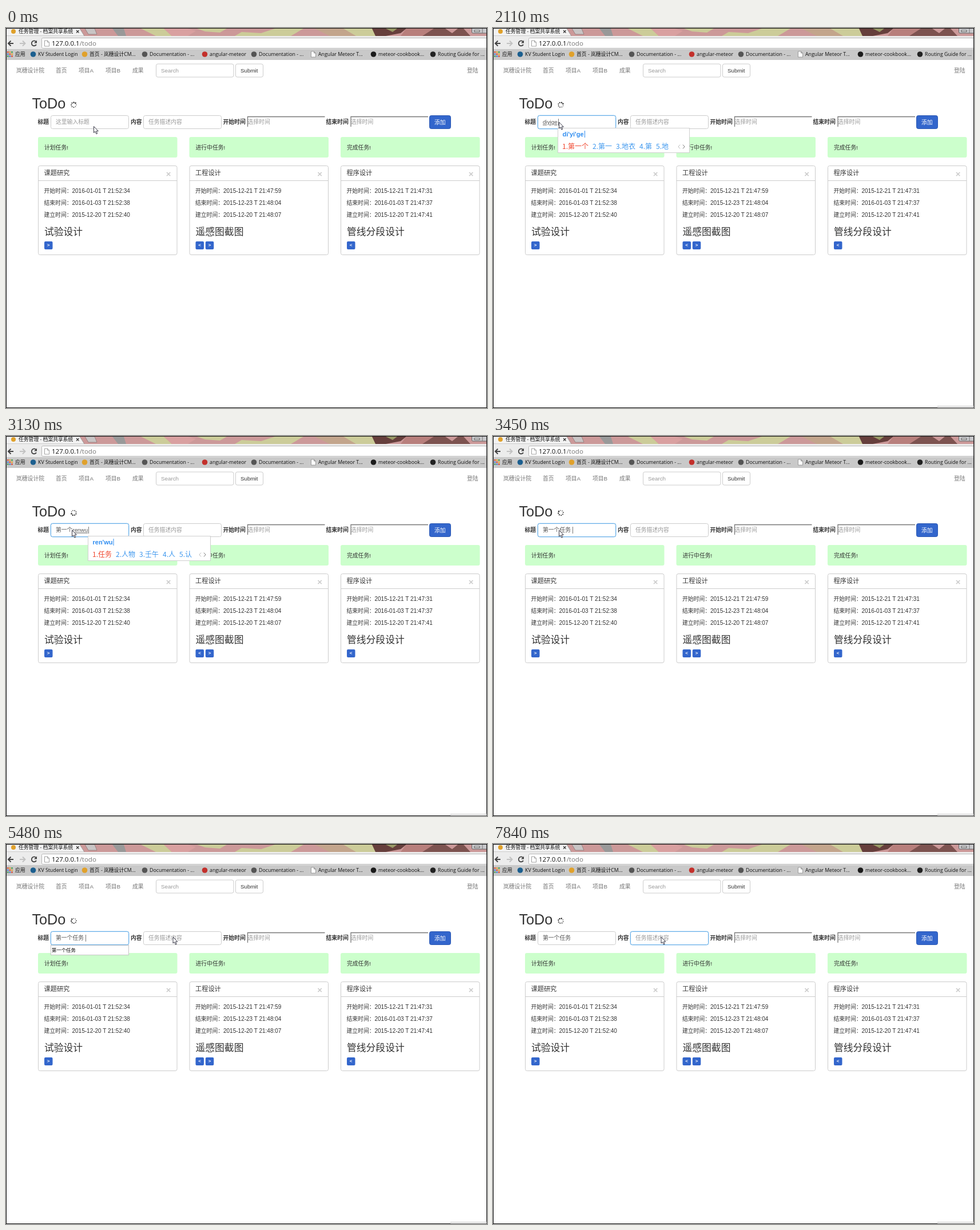
Write an HTML page that moves like this. It is 841 px wide and 666 px high and loops after 8000 ms.

```html
<!DOCTYPE html>
<html>
<head>
<meta charset="utf-8">
<style>
  html, body { margin: 0; width: 100%; height: 100%; overflow: hidden; background: #fff; }
  svg { display: block; width: 841px; height: 666px; }
  text { font-family: "Liberation Sans", "Noto Sans CJK SC", "Noto Sans CJK", sans-serif; font-size: 9.8px; fill: #333; white-space: pre; }
  .chrome { font-family: "Open Sans", "Noto Sans CJK SC", "Noto Sans CJK", sans-serif; font-size: 8.8px; fill: #111; }
  .url { font-family: "Open Sans", sans-serif; font-size: 11.5px; fill: #111; }
  .nav { fill: #777; }
  .hint { fill: #999; }
  .typed { fill: #555; }
  .label { font-weight: bold; }
  .alert { font-weight: 500; }
  .h1 { font-size: 25.2px; }
  .cardTitle { font-size: 11.2px; }
  .body { font-size: 16.8px; font-weight: 300; }
  .date { font-size: 10px; }
  .close { font-size: 15px; font-weight: bold; fill: #ccc; }
  .white { fill: #fff; }
  .arrow { font-size: 8px; font-weight: bold; fill: #fff; text-anchor: middle; }
  .suggestion { font-size: 8.4px; fill: #000; }
  .pinyin { font-size: 11px; font-weight: bold; fill: #2d8cf0; }
  .candidate { font-family: "Noto Sans CJK SC", "Noto Sans CJK", sans-serif; font-size: 12px; fill: #3d97ee; }
  .first { fill: #f0452c; }
  .composing { text-decoration: underline; }
</style>
</head>
<body>
<svg viewBox="0 0 841 666"><g id="page"></g><g id="live"></g></svg>
<script>
const LOOP = 8000;
const BLUE = '#3366cc';

const text = (x, y, str, cls = '') => `<text x="${x}" y="${y}" class="${cls}">${str}</text>`;
const rect = (x, y, w, h, fill, stroke = 'none', r = 0) =>
  `<rect x="${x}" y="${y}" width="${w}" height="${h}" rx="${r}" fill="${fill}" stroke="${stroke}"/>`;
const dot = (x, y, r, fill) => `<circle cx="${x}" cy="${y}" r="${r}" fill="${fill}"/>`;
const path = (d, fill, stroke = 'none', w = 1) =>
  `<path d="${d}" fill="${fill}" stroke="${stroke}" stroke-width="${w}"/>`;
const field = (x, y, w) => rect(x, y, w, 23, '#fff', '#ccc', 3);
const pageIcon = (x, y) => path(`M${x} ${y}h5l3 3v7h-8zM${x + 5} ${y}v3h3`, '#fff', '#888', .8);

function tabStrip() {
  const patches = [
    ['M186 1H206L210 14H196Z', '#999999'],
    ['M236 1H276L290 14H262Z', '#cccc99'],
    ['M276 1H318L332 5L318 14H290Z', '#d9a0a0'],
    ['M334 1H386L374 8L348 6Z', '#cccc99'],
    ['M400 14L412 7L446 9L470 1H520L498 14Z', '#cccc99'],
    ['M540 1H590L612 14H566Z', '#c3a58c'],
    ['M590 1H642L650 14H612Z', '#cccc99'],
    ['M640 1H700L690 9L664 14H646Z', '#663f3c'],
    ['M664 1H684L676 7Z', '#999966'],
    ['M700 1H756L734 14H690Z', '#b87f7c'],
    ['M748 1H800L812 14H728Z', '#7d5350'],
    ['M768 1H790L780 9Z', '#cc9999']
  ];
  return rect(0, 0, 841, 14, '#cc9999')
    + patches.map(p => path(...p)).join('')
    + path('M0 14V1H129L137 14Z', '#f2f2f2', '#888', .7)
    + path('M138 1H155L159 11H144Z', '#c9c5c5', '#8d7777', .8)
    + dot(13, 6, 4, '#e0a12b')
    + text(22, 9.3, '任务管理 - 档案共享系统', 'chrome')
    + path('M123 4l4.5 4.5m0-4.5l-4.5 4.5', 'none', '#333', 1.2)
    + rect(814.5, -2, 27, 11, '#c9c9cc', '#666', 2)
    + rect(819, 4, 9, 2.5, '#fff', '#555') + path('M833 0V9', 'none', '#777');
}

function toolbar() {
  return rect(0, 14, 841, 23, '#ececec')
    + path('M13 27H4.5M8.5 22.5L4 27L8.5 31.5', 'none', '#444', 2)
    + path('M24 27H33M29 22.5L33.5 27L29 31.5', 'none', '#c2c2c2', 2)
    + path('M52.5 24A4.4 4.4 0 1 0 53 29', 'none', '#444', 1.8)
    + path('M54 21.5V26.5H49Z', '#444')
    + rect(62.5, 17.5, 790, 18, '#fff', '#b5b5b5', 2)
    + pageIcon(67.5, 22)
    + text(80, 31, '127.0.0.1<tspan fill="#777">/todo</tspan>', 'url');
}

function bookmarks() {
  const hues = ['#d9442f', '#e8a020', '#3c9a4c', '#3f78d0'];
  let out = rect(0, 37, 841, 19, '#c9c9c9');
  for (let i = 0; i < 9; i++) out += rect(2 + i % 3 * 3.6, 41 + (i / 3 | 0) * 3.6, 2.5, 2.5, hues[i % 4]);
  const items = [
    [16, '应用'], [56, 'KV Student Login', '#1c5f8f'], [146, '首页 - 岚穗设计CM...', '#e0a12b'],
    [251, 'Documentation - ...', '#555'], [356, 'angular-meteor', '#c3302b'],
    [442, 'Documentation - ...', '#555'], [546, 'Angular Meteor T...', 'page'],
    [651, 'meteor-cookbook...', '#1b1b1b'], [755, 'Routing Guide for ...', '#222']
  ];
  for (const [x, label, icon] of items) {
    out += text(x, 49.3, label, 'chrome');
    if (icon === 'page') out += pageIcon(x - 12.5, 41);
    else if (icon) out += dot(x - 8.5, 46, 4.8, icon);
  }
  return out;
}

function navbar() {
  const links = [[18, '岚穗设计院'], [87, '首页'], [127, '项目A'], [174, '项目B'], [221, '成果'], [806, '登陆']];
  return links.map(([x, s]) => text(x, 78.3, s, 'nav')).join('')
    + field(262.5, 63, 135.5) + text(271, 78, 'Search', 'hint')
    + field(401.5, 63, 48) + text(410, 78, 'Submit');
}

function form() {
  const dateField = x => path(`M${x} 173V155.5H${x + 135}`, 'none', '#777', 1.3)
    + text(x, 168, '选择时间', 'hint');
  return text(45.5, 141.3, 'ToDo', 'h1')
    + text(55.5, 168, '标题', 'label') + field(78.5, 153.5, 136)
    + text(218, 168, '内容', 'label') + field(240.5, 153.5, 136)
    + text(379.5, 168, '开始时间', 'label') + dateField(422.5)
    + text(559.5, 168, '结束时间', 'label') + dateField(603)
    + rect(740.5, 153.5, 37, 23, BLUE, '#2d59b3', 3) + text(749, 168.6, '添加', 'white');
}

function column(x, heading, title, times, body, arrows) {
  const rows = ['开始时间：', '结束时间：', '建立时间：'];
  return rect(x, 191, 243.5, 36, '#ccffcc', 'none', 3)
    + text(x + 11, 212.5, heading, 'alert')
    + rect(x + .5, 241.5, 242.5, 156, '#fff', '#ccc', 3)
    + path(`M${x} 267.5h243`, 'none', '#ccc')
    + text(x + 10.5, 258.3, title, 'cardTitle')
    + text(x + 223.7, 260.8, '×', 'close')
    + rows.map((s, i) => text(x + 10.5, 289 + 21 * i, s) + text(x + 59.5, 289 + 21 * i, times[i], 'date')).join('')
    + text(x + 11, 363, body, 'body')
    + arrows.map((s, i) => rect(x + 11 + 17.3 * i, 374, 14.5, 14, BLUE, 'none', 2)
      + text(x + 18.2 + 17.3 * i, 383.4, s, 'arrow')).join('');
}

document.getElementById('page').innerHTML = rect(0, 0, 841, 666, '#fff')
  + tabStrip() + toolbar() + bookmarks() + navbar() + form()
  + column(56, '计划任务!', '课题研究',
    ['2016-01-01 T 21:52:34', '2016-01-03 T 21:52:38', '2015-12-20 T 21:52:40'], '试验设计', ['&gt;'])
  + column(320.5, '进行中任务!', '工程设计',
    ['2015-12-21 T 21:47:59', '2015-12-23 T 21:48:04', '2015-12-20 T 21:48:07'], '遥感图截图', ['&lt;', '&gt;'])
  + column(585, '完成任务!', '程序设计',
    ['2015-12-21 T 21:47:31', '2016-01-03 T 21:47:37', '2015-12-20 T 21:47:41'], '管线分段设计', ['&lt;'])
  + rect(.5, .5, 840, 665, 'none', '#111');

// Each step changes only the listed properties; the rest carry over.
const steps = [
  { at: 0, mouse: [153.5, 172.5], title: '', keys: '', focus: null, glow: false, caret: 0, ime: null, suggest: false },
  { at: 100, mouse: [115.5, 172] },
  { at: 420, mouse: [115.5, 165] },
  { at: 770, focus: 78.5, caret: 88 },
  { at: 1110, glow: true },
  { at: 1450, caret: 0 },
  { at: 1770, keys: 'd', caret: 94, ime: [94, 182, 'd', '的 地 到 对 都'] },
  { at: 2110, keys: 'diyige', caret: 114, ime: [113, 231, "di'yi'ge", '第一个 第一 地衣 第 地'] },
  { at: 2460, title: '第一个', keys: '', caret: 117, ime: null, suggest: true },
  { at: 2780, keys: 're', caret: 126, ime: [124, 206, 're', '热 惹 热情 热爱 喏'], suggest: false },
  { at: 3130, keys: 'renwu', caret: 144, ime: [143, 215, "ren'wu", '任务 人物 壬午 人 认'] },
  { at: 3450, title: '第一个任务', keys: '', caret: 139, ime: null },
  { at: 3800, caret: 0 },
  { at: 4110, mouse: [228.5, 161] },
  { at: 4460, mouse: [282.5, 161.5], caret: 139 },
  { at: 4800, mouse: [281.5, 160.5], caret: 0 },
  { at: 5140, mouse: [282, 164] },
  { at: 5480, mouse: [292, 163], caret: 139, suggest: true },
  { at: 5830, mouse: [294, 163], focus: 240.5, glow: false, caret: 249, suggest: false },
  { at: 6170, glow: true },
  { at: 6490, caret: 0 },
  { at: 6830 },
  { at: 7170, caret: 249 },
  { at: 7520, caret: 0 },
  { at: 7840 }
];
steps.reduce((prev, step) => Object.assign(step, { ...prev, ...step }));

function spinner(time) {
  let out = '';
  for (let i = 0; i < 8; i++) {
    const a = (i / 8 + time / 2000) * 2 * Math.PI;
    out += dot(118.5 + 4.3 * Math.cos(a), 134.7 + 4.3 * Math.sin(a), .75 + .08 * i, '#333');
  }
  return out;
}

function imePopup([x, width, pinyin, words]) {
  const pinyinWidth = { "d": 7, "di'yi'ge": 38, "re": 10.5, "ren'wu": 35.5 }[pinyin];
  const right = x + width;
  let cx = x + 8;
  const candidates = words.split(' ').map((word, i) => {
    const item = text(cx, 212, `${i + 1}.${word}`, i ? 'candidate' : 'candidate first');
    cx += 17 + 12 * word.length;
    return item;
  }).join('');
  return rect(x + .5, 175.5, width - 1, 43, '#fff', '#cfcfcf')
    + text(x + 8.5, 190, pinyin, 'pinyin')
    + path(`M${x + 9.5 + pinyinWidth} 180v12`, 'none', '#2d8cf0')
    + candidates
    + path(`M${right - 17} 204.5l-3 3.5l3 3.5`, 'none', '#bbb')
    + path(`M${right - 12} 204.5l3 3.5l-3 3.5`, 'none', '#777');
}

function draw(s) {
  const [mx, my] = s.mouse;
  let out = spinner(s.at);
  if (s.focus) {
    if (s.glow) out += rect(s.focus - .5, 153, 137, 24, 'none', 'rgba(102,175,233,.6)', 3.5);
    out += rect(s.focus, 153.5, 136, 23, '#fff', '#66afe9', 3);
  }
  out += s.title || s.keys
    ? text(87, 168.4, `${s.title}<tspan class="composing">${s.keys}</tspan>`, 'typed')
    : text(87, 168.4, '这里输入标题', 'hint');
  out += text(249, 168.4, '任务描述内容', 'hint');
  if (s.caret) out += path(`M${s.caret + .5} 159v12`, 'none', '#555', .8);
  if (s.suggest) out += rect(78.5, 177.5, 136, 17, '#fff', '#c4c4c4') + text(80, 189.3, '第一个任务', 'suggestion');
  if (s.ime) out += imePopup(s.ime);
  if (s.at >= 770) out += rect(777.5, 662.5, 62.5, 2.5, '#f4f4f4', '#d5d5d5');
  out += `<g transform="translate(${mx} ${my})">`
    + path('M0 0V11L2.5 8.8L4.4 13.2L6.2 12.4L4.4 8.2H7.8Z', '#fff', '#223', .9) + '</g>';
  return out;
}

const live = document.getElementById('live');
let shown = null;

function render() {
  const time = performance.now() % LOOP;
  const step = steps.findLast(s => s.at <= time);
  if (step !== shown) live.innerHTML = draw(shown = step);
  requestAnimationFrame(render);
}
render();
</script>
</body>
</html>
```
